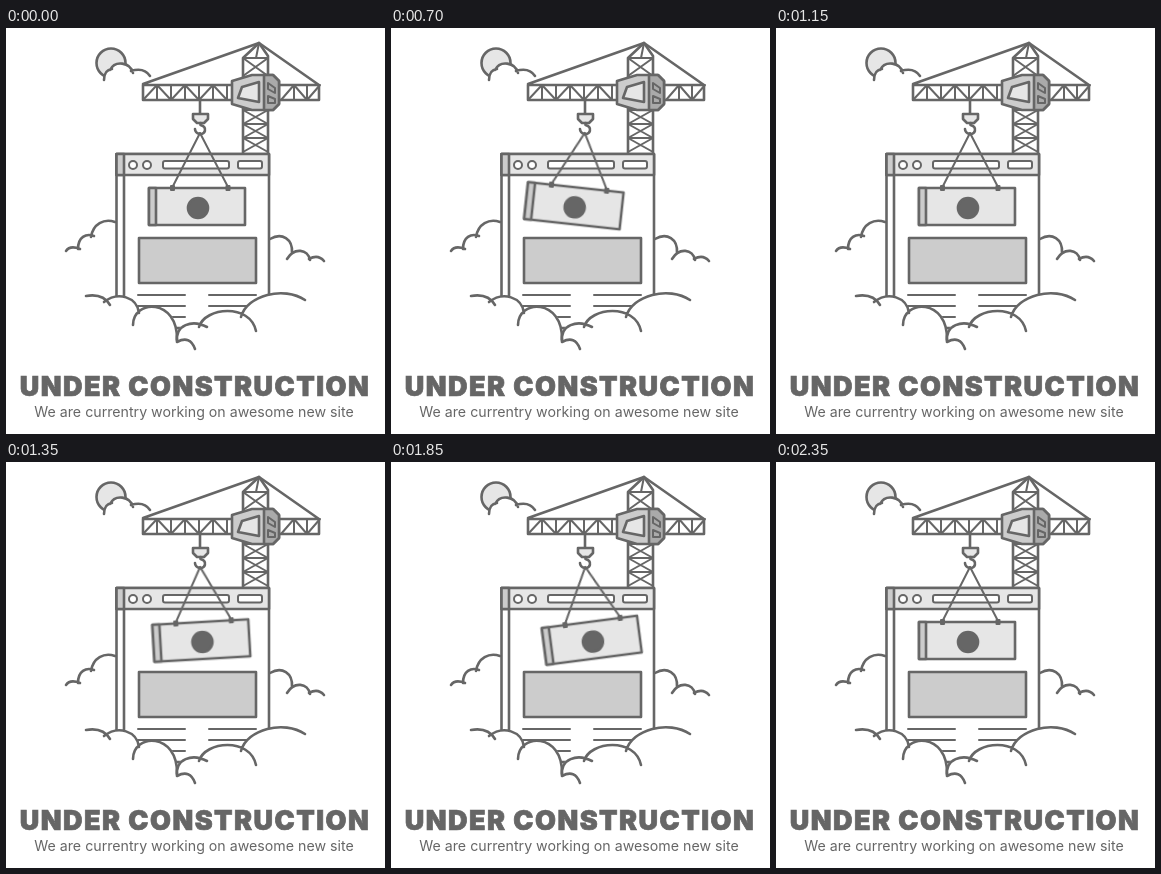
These frames come from a looping animation (379x406 px, 2400 ms). An HTML page:

```html
<!DOCTYPE html>
<html lang="en">
<head>
<meta charset="utf-8">
<title>Under construction</title>
<style>
  html, body { margin: 0; width: 100%; height: 100%; overflow: hidden; background: #fff; }
  svg { display: block; width: 379px; height: 406px; }
  .ink { fill: none; stroke: #666; stroke-width: 2.6; stroke-linecap: round; stroke-linejoin: round; }
  .thin { stroke-width: 2; }
  .white { fill: #fff; }
  .light { fill: #e6e6e6; }
  .mid { fill: #ccc; }
  .dark { fill: #aaa; }
  .solid { fill: #666; }
  .mask { fill: #fff; stroke: none; }
  text { fill: #666; text-anchor: middle; }
  .title { font: 900 27px Inter, sans-serif; letter-spacing: 1.5px; stroke: #666; stroke-width: .7px; }
  .sub { font: 400 14.2px Inter, sans-serif; }
  .sign { transform-origin: 194px 103px; animation: swing 2400ms ease infinite; }
  @keyframes swing {
    0%, 50%, 100% { transform: rotate(0deg); }
    25% { transform: rotate(8deg); }
    75% { transform: rotate(-8deg); }
  }
</style>
</head>
<body>
<svg viewBox="0 0 379 406">
  <g class="ink">
    <!-- sun -->
    <circle class="light" cx="105" cy="35" r="14.500"/>
    <path class="mask" d="M98 53Q97 43 105 41Q113 32 124 39L127 43Q138 40 144 48V56H98Z"/>
    <path d="M98 52Q98 42 106 41M104 42C109 32 124 34 127 45M125 43Q138 39 144 48"/>

    <!-- crane -->
    <path class="thin" d="M137 72L151 57L165 72L179 57L193 72L207 57L221 72M275 72L288 57L301 72L314 57"/>
    <path class="thin" d="M151 57V72M165 57V72M179 57V72M193 57V72M207 57V72M221 57V72M288 57V72M301 57V72"/>
    <path d="M137 57H313V72H137ZM137 56L253 15L313 57"/>
    <path d="M253 15L237 30V125M253 15L262 28V125"/>
    <path class="thin" d="M237 30H262L237 48M237 30L262 48M253 15L250 30"/>
    <path class="thin" d="M237 82H262L237 96H262L237 110H262L237 124M237 82L262 96M237 96L262 110M237 110L262 124"/>
    <path class="mid" d="M226 53L246 47H267L273 53V76L267 82H246L226 76Z"/>
    <path class="dark" d="M258 47H267L273 53V76L267 82H258Z"/>
    <path class="light" d="M232 70L236 59L253 54V74Z"/>
    <path class="thin" d="M262 55L269 60V65L262 61ZM262 68L269 71V75H262Z"/>
    <path d="M194 72V87"/>
    <path class="light" d="M187 86H202V91L198 95H191L187 91Z"/>
    <path d="M194.500 95V97C202 99 199 107 194 106Q189 105 189 101"/>

    <!-- browser window -->
    <path class="white" d="M110.500 126H263V300H110.500Z"/>
    <path class="light" d="M110.500 126H263V147H110.500Z"/>
    <path class="mid" d="M110.500 126H118V147H110.500Z"/>
    <path d="M118 147V300"/>
    <g class="white thin">
      <circle cx="127" cy="137" r="4"/>
      <circle cx="141" cy="137" r="4"/>
      <rect x="157" y="133" width="66" height="7.500" rx="2"/>
      <rect x="232" y="133" width="24" height="7.500" rx="2"/>
    </g>
    <rect class="mid" x="133" y="210" width="117" height="45"/>
    <path class="thin" d="M132 267H179M132 278H179M150 289H179M203 267H250M203 278H250M203 289H230"/>

    <!-- clouds -->
    <path d="M60 223Q64 217 74 221M72 221C72 209 80 205 88 208M85 209C87 196 98 190 109 194"/>
    <path d="M264 211C276 204 287 211 286 225M281 231C288 219 302 221 304 232M303 231Q312 226 318 233"/>
    <path class="mask" d="M100 274C114 262 132 269 133 285C150 272 168 280 171 303Q181 290 195 296C204 282 226 280 235 290C241 271 258 265 274 266L282 340H100Z"/>
    <path d="M80 268Q97 265 104 277M98 274C112 263 131 269 133 285M127 297C127 271 172 270 171 312"/>
    <path d="M171 314C169 297 186 291 201 299M193 299C199 279 244 275 250 303M235 289C241 267 278 258 299 272M171 314Q184 307 189 321"/>

    <!-- hanging sign -->
    <g class="sign">
      <path class="thin" d="M194 105L166.500 159M194 105L222 159"/>
      <rect class="light" x="143" y="160" width="96" height="37"/>
      <path class="mid" d="M143 160H150V197H143Z"/>
      <path class="solid thin" d="M165 158H168V162H165ZM220.500 158H223.500V162H220.500Z"/>
      <circle class="solid" cx="192" cy="180" r="10"/>
    </g>
  </g>
  <text class="title" x="189" y="367.500">UNDER CONSTRUCTION</text>
  <text class="sub" x="188" y="389">We are currentry working on awesome new site</text>
</svg>
</body>
</html>
```
